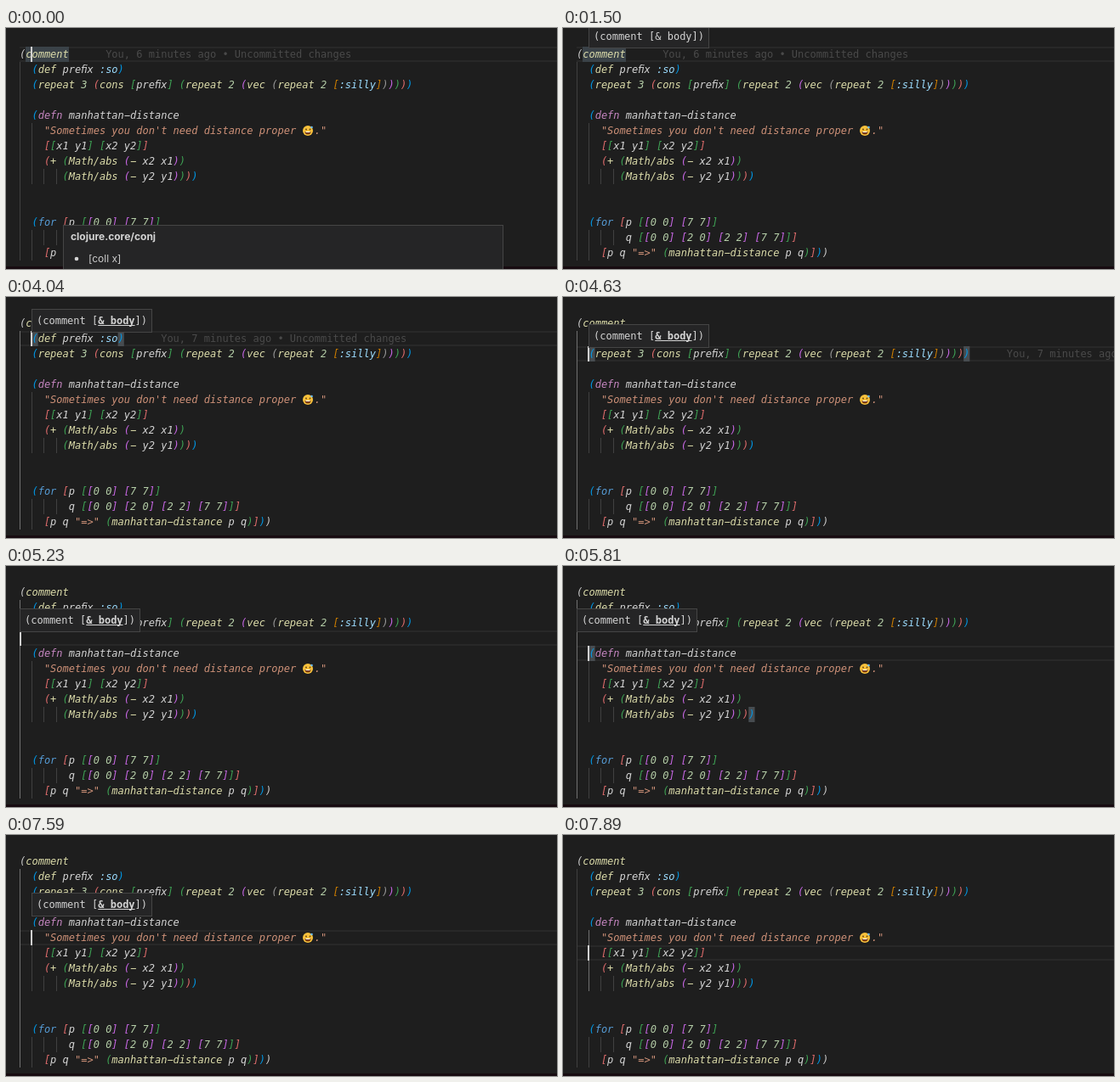
Write an HTML page with a canvas that moves like this. It is 648 px wide and 284 px high and loops after 8 s.

```html
<!DOCTYPE html>
<html>
<head>
<meta charset="utf-8">
<style>
html, body { margin: 0; width: 100%; height: 100%; overflow: hidden; background: #1e1e1e }
canvas { display: block }
</style>
</head>
<body>
<canvas id="stage" width="648" height="284"></canvas>
<script>
const ctx = document.getElementById('stage').getContext('2d');
const MONO = '"DejaVu Sans Mono", monospace';
const SANS = 'Inter, "Liberation Sans", sans-serif';
const LOOP = 8000, LEFT = 16, TOP = 22, ROW = 18, CHAR = 7.224;
const colX = col => LEFT + col * CHAR;
const rowY = row => TOP + row * ROW;

// The two spaces after "proper " hold the emoji.
const code = [
  '(comment',
  '  (def preﬁx :so)',
  '  (repeat 3 (cons [preﬁx] (repeat 2 (vec (repeat 2 [:silly])))))',
  '',
  '  (defn manhattan-distance',
  '    "Sometimes you don\'t need distance proper   ."',
  '    [[x1 y1] [x2 y2]]',
  '    (+ (Math/abs (- x2 x1))',
  '       (Math/abs (- y2 y1))))',
  '',
  '',
  '  (for [p [[0 0] [7 7]]',
  '        q [[0 0] [2 0] [2 2] [7 7]]]',
  '    [p q "=>" (manhattan-distance p q)]))'
];
const rainbow = ['#cccccc', '#0098e6', '#e16d6d', '#3fa455', '#c968e6', '#999999', '#ce7e00'];
const special = { def: '#dcdcaa', defn: '#c586c0', for: '#569cd6' };

function tokenize() {
  const tokens = [];
  let depth = 0, prev = '';
  code.forEach((line, row) => {
    for (const m of line.matchAll(/"[^"]*"|[()[\]]|[^\s()[\]"]+/g)) {
      const text = m[0];
      let color = '#d4d4d4';
      if ('(['.includes(text)) color = rainbow[depth++];
      else if (')]'.includes(text)) color = rainbow[--depth];
      else if (text[0] === '"') color = '#ce9178';
      else if (text[0] === ':') color = '#9cdcfe';
      else if (/^\d/.test(text)) color = '#b5cea8';
      else if (prev === '(') color = special[text] || '#dcdcaa';
      tokens.push({ text: text.replace(/-/g, '−'), row, col: m.index, color });
      prev = text;
    }
  });
  return tokens;
}
const tokens = tokenize();

// Each step changes part of the editor state.
const steps = [
  [0, { row: 0, col: 2, on: 1, hover: 1, tip: null, blame: 6, word: 1, match: [], scope: -1 }],
  [600, { on: 0 }],
  [750, { hover: 0 }],
  [1050, { on: 1 }],
  [1200, { tip: [0, 2] }],
  [1500, { on: 0 }],
  [2090, { on: 1 }],
  [2540, { on: 0 }],
  [2990, { on: 1 }],
  [3140, { row: 1, blame: 0, word: 0, match: [[1, 2], [1, 16]], scope: 0 }],
  [3290, { tip: [1, 2], arg: 1 }],
  [3440, { blame: 7 }],
  [3590, { on: 0 }],
  [4040, { on: 1 }],
  [4490, { row: 2, tip: [2, 2], blame: 0, match: [[2, 2], [2, 63]] }],
  [4630, { blame: 7 }],
  [4930, { on: 0 }],
  [5230, { row: 3, col: 0, on: 1, tip: [3, 0], blame: 0, match: [] }],
  [5520, { blame: 7 }],
  [5670, { row: 4, col: 2, blame: 0, match: [[4, 2], [8, 28]] }],
  [5820, { tip: [4, 2] }],
  [5960, { blame: 7 }],
  [6110, { on: 0 }],
  [6560, { on: 1 }],
  [7150, { on: 0 }],
  [7450, { row: 5, on: 1, blame: 0, match: [] }],
  [7600, { tip: null, scope: 1 }],
  [7740, { row: 6 }]
];

function rect(x, y, w, h, color) {
  ctx.fillStyle = color;
  ctx.fillRect(x, y, w, h);
}

function write(text, x, y, color, font) {
  ctx.font = font;
  ctx.fillStyle = color;
  ctx.fillText(text, x, y);
}

function box(x, y, w, h) {
  rect(x, y, w, h, '#454545');
  rect(x + 1, y + 1, w - 2, h - 2, '#252526');
}

function dot(x, y, r, color) {
  ctx.fillStyle = color;
  ctx.beginPath();
  ctx.arc(x, y, r, 0, 7);
  ctx.fill();
}

function guide(col, from, to, active) {
  rect(Math.floor(colX(col)), rowY(from), 1, (to - from + 1) * ROW, active ? '#707070' : '#404040');
}

function emoji(x, y) {
  dot(x, y, 6, '#f9c23c');
  dot(x - 2, y - 1.5, 1, '#6b4a12');
  dot(x + 2.5, y - 1.5, 1, '#6b4a12');
  ctx.fillStyle = '#7a3b12';
  ctx.beginPath();
  ctx.arc(x, y + 1, 3.5, 0, Math.PI);
  ctx.fill();
  rect(x - 2.5, y + 1, 5, 1, '#fff');
  dot(x + 4.5, y - 4, 1.3, '#6db9ee');
}

function tooltip([row, col], arg) {
  const x = Math.floor(colX(col)), y = rowY(row) - 26, base = y + 18;
  const put = (text, at, weight = '') =>
    write(text, x + 6 + at * CHAR, base, '#d4d4d4', `${weight} 12px ${MONO}`);
  box(x, y, 142, 28);
  put('(comment [', 0);
  put('& body', 10, arg ? 'bold' : '');
  put('])', 16);
  if (arg) rect(x + 6 + 10 * CHAR, base + 1, 6 * CHAR, 1, '#d4d4d4');
}

function hoverCard() {
  box(67, 232, 518, 60);
  write('clojure.core/conj', 76, 250, '#d4d4d4', `bold 12px ${SANS}`);
  dot(83, 272, 2.3, '#d4d4d4');
  write('[coll x]', 97, 276, '#cccccc', `12px ${SANS}`);
}

function draw(time) {
  const s = {};
  for (const [at, change] of steps) if (at <= time) Object.assign(s, change);
  const y = rowY(s.row);

  rect(0, 0, 648, 284, '#1e1e1e');
  rect(LEFT, y, 632, 2, '#282828');
  rect(LEFT, y + ROW - 2, 632, 2, '#282828');
  if (s.word) rect(23, TOP, 51, ROW, '#3a4248');
  for (const [row, col] of s.match) rect(colX(col), rowY(row), CHAR, ROW, '#474c50');

  guide(0, 1, 13, s.scope === 0);
  guide(2, 5, 8, s.scope === 1);
  guide(2, 12, 13);
  for (const row of [8, 12]) for (const col of [4, 6]) guide(col, row, row);

  for (const t of tokens) write(t.text, colX(t.col), rowY(t.row) + 13, t.color, `italic 12px ${MONO}`);
  emoji(355, 121);
  if (s.blame) {
    write(`You, ${s.blame} minutes ago • Uncommitted changes`,
      colX(code[s.row].length + 6), y + 13, '#4a4a4a', `12px ${MONO}`);
  }
  if (s.on) rect(s.col ? 29 : LEFT, y, 2, ROW, '#d0d0d0');

  rect(0, 281, 648, 3, '#170b10');
  if (s.tip) tooltip(s.tip, s.arg);
  if (s.hover) hoverCard();
}

function tick() {
  draw(performance.now() % LOOP);
  requestAnimationFrame(tick);
}
tick();
</script>
</body>
</html>
```
